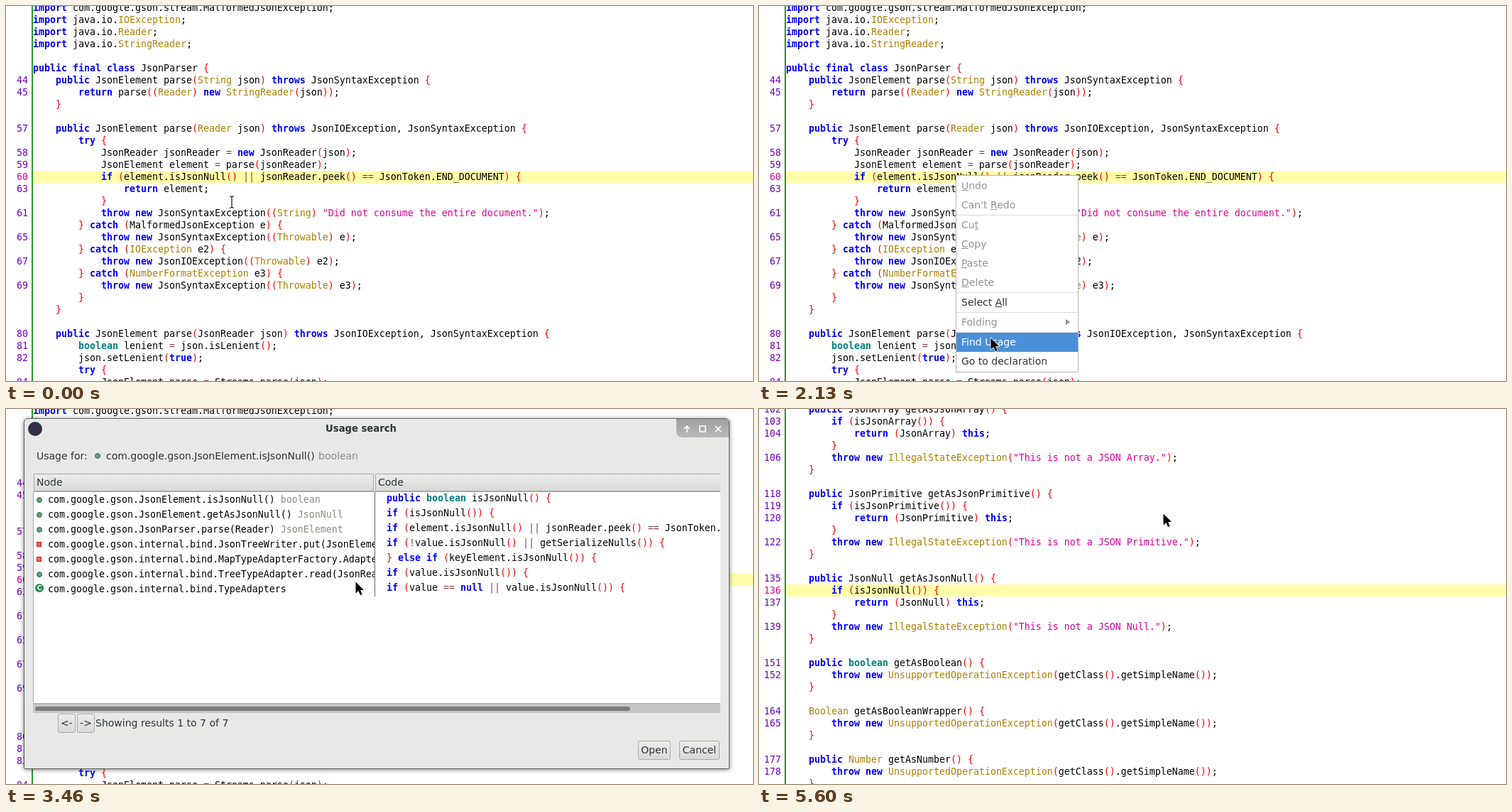
Animation of 1052x528 px, one loop 5.66 s. Source, as an HTML page:

```html
<!DOCTYPE html>
<html lang="en">
<head>
<meta charset="utf-8">
<style>
html, body { margin: 0; width: 100%; height: 100%; overflow: hidden; background: #fff; }
body { position: relative; font: 14px "DejaVu Sans", sans-serif; color: #2e3436; cursor: none; }
body > *, #dialog > * { position: absolute; box-sizing: border-box; white-space: pre; }
.mono, .code { font: 13.29px/17px "DejaVu Sans Mono", monospace; color: #000; }
.code { left: 0; width: 1052px; }
.code::before { content: ""; position: absolute; left: 36px; width: 2px; height: 560px; background: #2c962c; }
.line { height: 17px; padding-left: 38px; position: relative; }
.line i { position: absolute; left: 0; width: 31px; text-align: right; font-style: normal; color: #7000c0; }
.line.now { background: linear-gradient(#ffffaa, #ffffaa) 38px 0 no-repeat; }
.line.now i { color: #dc009c; }
.key { color: #00f; font-weight: bold; }
.type { color: #008080; font-weight: bold; }
.cls { color: #ad8000; }
.sep { color: #f00; }
.op { color: #804040; }
.str { color: #dc009c; }

#menu { left: 277px; top: 238px; width: 173px; padding: 1px 0; background: #fff; border: 1px solid #b4b4b4; }
#menu div { height: 27px; line-height: 27px; padding-left: 7px; position: relative; }
#menu hr { margin: 0; border: 0; height: 1px; background: #dcdcdc; }
#menu .off { color: #929595; }
#menu .on { background: #4a90d9; color: #fff; }
#menu .sub::after { content: ""; position: absolute; left: 154px; top: 9px; border: 4.5px solid transparent; border-left: 6px solid #8a8c8c; border-right: 0; }

#dialog { left: 25px; top: 13px; width: 994px; height: 494px; background: #e8e8e7; border: 1px solid #5c5c5c; border-radius: 6px 6px 2px 2px; box-shadow: 0 1px 6px rgba(0,0,0,.5), inset 0 1px #f8f8f8; }
#dialog > .grey, .grey { color: #8b8e86; }
.head, .button { border: 1px solid #a9aaa8; background: linear-gradient(#ececeb, #d9d9d8); }
.button { border-radius: 3px; text-align: center; height: 27px; line-height: 25px; }
.head { top: 77px; height: 25px; line-height: 23px; padding-left: 3px; border-radius: 2px 2px 0 0; }
.cell { height: 21px; line-height: 21px !important; overflow: hidden; }
.dot { width: 8px; height: 8px; border-radius: 50%; background: #5fa27c; border: 1px solid #2f6b4a; }
.box { width: 7px; height: 7px; background: #e8695c; border: 1px solid #d01818; }
.classIcon { width: 12px; height: 12px; border-radius: 50%; background: #2f8a58; color: #fff; font: bold 9px/12px "DejaVu Sans", sans-serif; text-align: center; }
</style>
</head>
<body>
<div class="code" id="parser" style="top:-6px"></div>
<div class="code" id="element" style="top:-8px"></div>
<div id="menu"></div>
<div id="dialog"></div>
<svg id="arrow" width="16" height="24" style="overflow:visible"><path d="M.5.5V16.5L4.3 13L7 19L9.7 17.9L7.1 12H12Z" stroke="#fff" stroke-width="1.4" paint-order="stroke"/></svg>
<svg id="beam" width="12" height="20" style="overflow:visible"><path d="M-3-8H-1L0-7L1-8H3M0-7V7M-3 8H-1L0 7L1 8H3" fill="none" stroke="#111" stroke-width="1.2"/></svg>

<script>
const $ = id => document.getElementById(id);

// Code listings: "number|text"
const parserCode = `|import com.google.gson.stream.MalformedJsonException;
|import java.io.IOException;
|import java.io.Reader;
|import java.io.StringReader;
|
|public final class JsonParser {
44|    public JsonElement parse(String json) throws JsonSyntaxException {
45|        return parse((Reader) new StringReader(json));
|    }
|
57|    public JsonElement parse(Reader json) throws JsonIOException, JsonSyntaxException {
|        try {
58|            JsonReader jsonReader = new JsonReader(json);
59|            JsonElement element = parse(jsonReader);
60|            if (element.isJsonNull() || jsonReader.peek() == JsonToken.END_DOCUMENT) {
63|                return element;
|            }
61|            throw new JsonSyntaxException((String) "Did not consume the entire document.");
|        } catch (MalformedJsonException e) {
65|            throw new JsonSyntaxException((Throwable) e);
|        } catch (IOException e2) {
67|            throw new JsonIOException((Throwable) e2);
|        } catch (NumberFormatException e3) {
69|            throw new JsonSyntaxException((Throwable) e3);
|        }
|    }
|
80|    public JsonElement parse(JsonReader json) throws JsonIOException, JsonSyntaxException {
81|        boolean lenient = json.isLenient();
82|        json.setLenient(true);
|        try {
84|            JsonElement parse = Streams.parse(json);`;

const elementCode = `102|    public JsonArray getAsJsonArray() {
103|        if (isJsonArray()) {
104|            return (JsonArray) this;
|        }
106|        throw new IllegalStateException("This is not a JSON Array.");
|    }
|
118|    public JsonPrimitive getAsJsonPrimitive() {
119|        if (isJsonPrimitive()) {
120|            return (JsonPrimitive) this;
|        }
122|        throw new IllegalStateException("This is not a JSON Primitive.");
|    }
|
135|    public JsonNull getAsJsonNull() {
136|        if (isJsonNull()) {
137|            return (JsonNull) this;
|        }
139|        throw new IllegalStateException("This is not a JSON Null.");
|    }
|
151|    public boolean getAsBoolean() {
152|        throw new UnsupportedOperationException(getClass().getSimpleName());
|    }
|
164|    Boolean getAsBooleanWrapper() {
165|        throw new UnsupportedOperationException(getClass().getSimpleName());
|    }
|
177|    public Number getAsNumber() {
178|        throw new UnsupportedOperationException(getClass().getSimpleName());
|    }`;

const tokens = new RegExp([
  '(?<str>"[^"]*")',
  '(?<key>\\b(?:import|public|final|class|throws?|return|new|try|catch|if|else|this|true|null)\\b)',
  '(?<type>\\bboolean\\b)',
  '(?<cls>\\b(?:(?:IO|NumberFormat|IllegalState|UnsupportedOperation)Exception|(?:String)?Reader|String|Throwable|Boolean|Number)\\b)',
  '(?<sep>[(){}])',
  '(?<op>[=|!]+)'
].join('|'), 'g');

const paint = text => text.replace(tokens, (match, ...rest) => {
  const kind = Object.entries(rest.at(-1)).find(([, value]) => value)[0];
  return `<span class="${kind}">${match}</span>`;
});

function listing(id, source, current) {
  $(id).innerHTML = source.split('\n').map(row => {
    const bar = row.indexOf('|'), number = row.slice(0, bar);
    return `<div class="line${number === current ? ' now' : ''}"><i>${number}</i>${paint(row.slice(bar + 1))}</div>`;
  }).join('');
}
listing('parser', parserCode, '60');
listing('element', elementCode, '136');

// "_" precedes a mnemonic, "~" marks a disabled entry, "-" is a separator
$('menu').innerHTML = ["~_Undo", "~Can't _Redo", '-', '~Cu_t', '~_Copy', '~_Paste', '~_Delete', '-',
  'Select _All', '-', '~Folding', '-', 'Find Usage', 'Go to declaration'].map(item => {
  if (item === '-') return '<hr>';
  const kind = (item[0] === '~' ? 'off' : '') + (item === '~Folding' ? ' sub' : '');
  return `<div class="${kind}">${item.replace('~', '').replace(/_(.)/, '<u>$1</u>')}</div>`;
}).join('');
const entries = [...$('menu').querySelectorAll('div:not(.off)')];

// Dialog parts use stage coordinates
const part = (x, y, css = '', cls = '', html = '') =>
  `<div class="${cls}" style="left:${x - 26}px;top:${y - 14}px;${css}">${html}</div>`;
const label = (x, y, html, cls = '', css = '') => part(x, y - 10, 'line-height:20px;' + css, cls, html);
const button = (x, y, width, html) => part(x, y, `width:${width}px`, 'button', html);

const results = [
  ['dot', 'JsonElement.isJsonNull()', 'boolean', 'public boolean isJsonNull() {'],
  ['dot', 'JsonElement.getAsJsonNull()', 'JsonNull', 'if (isJsonNull()) {'],
  ['dot', 'JsonParser.parse(Reader)', 'JsonElement', 'if (element.isJsonNull() || jsonReader.peek() == JsonToken.END_DOCUMENT) {'],
  ['box', 'internal.bind.JsonTreeWriter.put(JsonElement)', 'void', 'if (!value.isJsonNull() || getSerializeNulls()) {'],
  ['box', 'internal.bind.MapTypeAdapterFactory.Adapter', '', '} else if (keyElement.isJsonNull()) {'],
  ['dot', 'internal.bind.TreeTypeAdapter.read(JsonReader)', '', 'if (value.isJsonNull()) {'],
  ['classIcon', 'internal.bind.TypeAdapters', '', 'if (value == null || value.isJsonNull()) {']
];

$('dialog').innerHTML =
  part(31, 18, 'width:20px;height:20px;border-radius:50%;background:#332f4a') +
  label(26, 28, 'Usage search', '', 'width:948px;text-align:center;font-weight:bold;font-size:13.2px') +
  part(944, 14, 'width:74px;height:26px;border-radius:0 5px 0 8px;background:linear-gradient(#9f9f9f,#b9b9b9)', '',
    `<svg width="74" height="26" fill="none" stroke="#fff" stroke-width="1.7" style="display:block">
     <path d="M15 19V10M11 14L15 10L19 14M33 10H41V18H33ZM55 10L63 18M63 10L55 18"/></svg>`) +
  label(43, 66, 'Usage for:') +
  part(125, 62, '', 'dot') +
  label(141, 66, 'com.google.gson.JsonElement.isJsonNull()') +
  label(440, 66, 'boolean', 'grey') +
  part(39, 91, 'width:479px', 'head', 'Node') +
  part(520, 91, 'width:486px;border-right:0', 'head', 'Code') +
  part(38, 116, 'width:968px;height:299px;background:#fff;border:solid #a9aaa8;border-width:1px 0 1px 1px') +
  results.map(([icon, node, result, code], i) => {
    const y = 117 + i * 21;
    const [dx, dy] = icon === 'classIcon' ? [41, 3] : [43, 7];
    return part(dx, y + dy, '', icon, icon === 'classIcon' ? 'C' : '') +
      part(59, y, 'width:461px', 'mono cell', `com.google.gson.${node} <span class="grey">${result}</span>`) +
      part(536, y - 2, 'width:470px', 'mono cell', paint(code));
  }).join('') +
  part(519, 117, 'width:1px;height:147px;background:#6c6c6c') +
  part(38, 415, 'width:968px;height:13px;background:#c5c5c4') +
  part(41, 419, 'width:838px;height:6px;border-radius:3px;background:#7b7b7b') +
  button(73, 429, 25, '&lt;-') + button(100, 429, 25, '-&gt;') +
  label(126, 442, 'Showing results 1 to 7 of 7') +
  button(890, 467, 46, 'Open') + button(948, 467, 57, 'Cancel');

const LOOP = 5660, STEP = 66.6;
const menuOpen = 800, dialogOpen = 2260, dialogClose = 4320;

// Pointer path: time, x, y
const path = [[0, 318, 276], [130, 318, 276], [600, 277, 238], [930, 277, 238], [1400, 310, 358],
  [1860, 326, 467], [2500, 326, 467], [3000, 385, 376], [3800, 569, 147], [LOOP, 569, 147]];

function pointer(t) {
  const i = path.findIndex(p => p[0] > t);
  const a = path[i - 1], b = path[i], k = (t - a[0]) / (b[0] - a[0]);
  return [1, 2].map(n => Math.round(a[n] + (b[n] - a[n]) * k));
}

const show = (id, on) => $(id).style.visibility = on ? 'visible' : 'hidden';

function frame(now) {
  const t = Math.floor(now % LOOP / STEP + 0.2) * STEP % LOOP;
  const [x, y] = pointer(t);
  const hasMenu = t >= menuOpen && t < dialogOpen;
  show('parser', t < dialogClose);
  show('element', t >= dialogClose);
  show('menu', hasMenu);
  show('dialog', t >= dialogOpen && t < dialogClose);
  show('beam', t < menuOpen);
  show('arrow', t >= menuOpen);
  for (const id of ['arrow', 'beam']) {
    $(id).style.left = x + 'px';
    $(id).style.top = y + 'px';
  }
  for (const entry of entries) {
    const top = 239 + entry.offsetTop;
    entry.className = y >= top && y < top + 27 ? 'on' : '';
  }
  requestAnimationFrame(frame);
}
requestAnimationFrame(frame);
</script>
</body>
</html>
```
